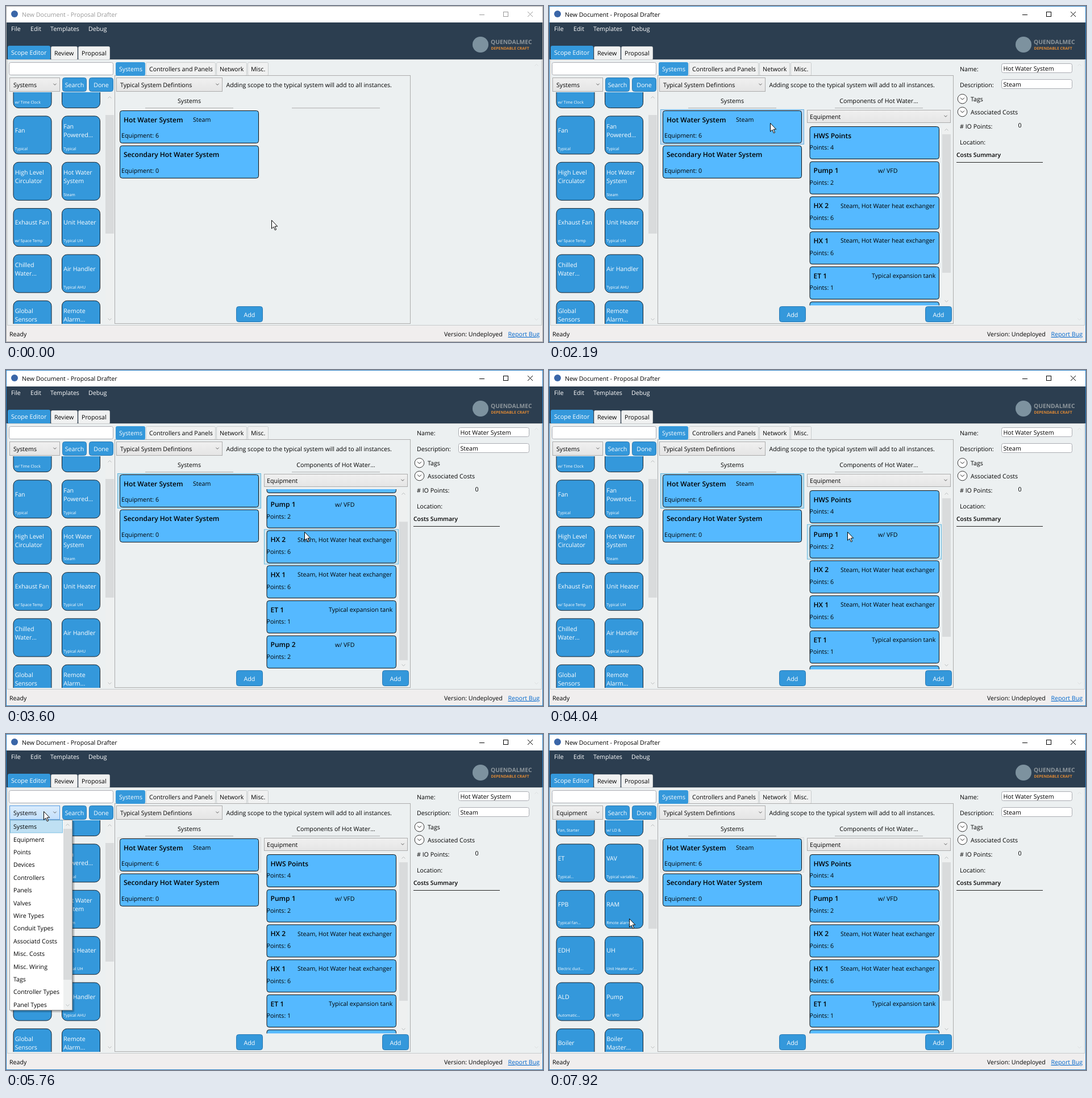
Write an HTML page that moves like this. It is 945x592 px and loops after 8 s.

```html
<!DOCTYPE html>
<html lang="en">
<head>
<meta charset="utf-8">
<title>Scope editor</title>
<style>
html, body { margin: 0; width: 100%; height: 100%; overflow: hidden; }
svg { display: block; width: 945px; height: 592px; }
text { font: 10.65px "Open Sans", "Noto Sans", sans-serif; text-rendering: geometricPrecision; white-space: pre; }
</style>
</head>
<body>
<svg id="stage" viewBox="0 0 945 592">
  <defs>
    <linearGradient id="gray" x2="0" y2="1"><stop stop-color="#f0f0f0"/><stop offset="1" stop-color="#e5e5e5"/></linearGradient>
    <linearGradient id="hot" x2="0" y2="1"><stop stop-color="#ecf4fc"/><stop offset="1" stop-color="#dcecfc"/></linearGradient>
    <linearGradient id="pressed" x2="0" y2="1"><stop stop-color="#daecfc"/><stop offset="1" stop-color="#c4e0fc"/></linearGradient>
    <clipPath id="tileClip"><rect x="3" y="152" width="172" height="408"/></clipPath>
    <clipPath id="partClip"><rect x="453" y="210" width="239" height="317.5"/></clipPath>
    <clipPath id="dropClip"><rect x="5" y="151" width="118" height="342"/></clipPath>
  </defs>
  <g id="scene"></g>
</svg>
<script>
const LOOP = 8000, BLUE = '#3498db', PAPER = '#ecf0f1', LINE = '#acacac', PITCH = 61.75;
const LISTS = {
  Systems: [';w/ Time Clock', ';', 'Fan;Typical', 'Fan|Powered...;Typical', 'High Level|Circulator;', 'Hot Water|System;Steam',
    'Exhaust Fan;w/ Space Temp', 'Unit Heater;Typical UH', 'Chilled|Water...;', 'Air Handler;Typical AHU',
    'Global|Sensors;', 'Remote|Alarm...;'],
  Equipment: [';Fan, Starter', ';w/ LD &amp; CP', 'ET;Typical...', 'VAV;Typical variable...', 'FPB;Typical fan...', 'RAM;Rmote alarm...',
    'EDH;Electric duct...', 'UH;Unit Heater w/...', 'ALD;Automatic...', 'Pump;w/ VFD', 'Boiler;', 'Boiler|Master...;']
};
const KINDS = ['Systems', 'Equipment', 'Points', 'Devices', 'Controllers', 'Panels', 'Valves', 'Wire Types', 'Conduit Types',
  'Associatd Costs', 'Misc. Costs', 'Misc. Wiring', 'Tags', 'Controller Types', 'Panel Types'];
const EXCHANGER = ['Steam, Hot Water heat exchanger', 513];
const PARTS = [['HWS Points', 4, '', 0], ['Pump 1', 2, 'w/ VFD', 579], ['HX 2', 6, ...EXCHANGER], ['HX 1', 6, ...EXCHANGER],
  ['ET 1', 1, 'Typical expansion tank', 568], ['Pump 2', 2, 'w/ VFD', 579]];

// Pointer moves: first step, last step, step count, bend, end.
const START = [467, 377];
const MOVES = [
  [120, 720, 10, [520, 300], [369, 210]],
  [2190, 2190, 1, [380, 208], [389, 206]],
  [2267, 2730, 7, [470, 218], [523, 281]],
  [3500, 3600, 2, [524, 283], [525, 285]],
  [4740, 5210, 7, [394, 211], [99, 156]],
  [5290, 5520, 4, [80, 142], [66, 136]],
  [6230, 6460, 4, [68, 160], [68, 188]],
  [6690, 6690, 1, [69, 189], [69, 189]],
  [7150, 7230, 2, [71, 189], [72, 189]],
  [7540, 7920, 6, [196, 250], [141, 325]]
];

function pointer(t) {
  let p = START;
  for (const [from, to, n, bend, end] of MOVES) {
    if (t < from) break;
    const step = (to - from) / (n - 1) || 1;
    const u = Math.min(n, Math.floor((t - from) / step + 1e-6) + 1) / n, v = 1 - u;
    p = p.map((a, i) => v * v * a + 2 * u * v * bend[i] + u * u * end[i]);
  }
  return p;
}

// The last value whose time has come.
const at = (t, ...steps) => steps.reduce((now, [time, value]) => t >= time ? value : now, 0);

const rect = (x, y, w, h, fill, stroke = 'none', r = 0, more = '') =>
  `<rect x="${x}" y="${y}" width="${w}" height="${h}" rx="${r}" fill="${fill}" stroke="${stroke}" ${more}/>`;
const text = (x, y, s, fill = '#000', style = '', anchor = 'start') =>
  `<text x="${x}" y="${y}" fill="${fill}" style="${style}" text-anchor="${anchor}">${s}</text>`;
const path = (d, stroke, more = '') => `<path d="${d}" fill="none" stroke="${stroke}" ${more}/>`;
const hline = (x1, x2, y, color) => path(`M${x1} ${y}H${x2}`, color);
const chevron = (x, y, dir = 1, color = '#606060', s = 2.6) =>
  path(`M${x - s} ${y - s / 2 * dir}l${s} ${s * dir}l${s} ${-s * dir}`, color);
const bold = size => `font-weight:600;font-size:${size}px`;

const combo = (x, y, w, h, label, fill = 'gray', border = LINE) =>
  rect(x + .5, y + .5, w - 1, h - 1, `url(#${fill})`, border) +
  text(x + (h > 24 ? 7 : 5), y + h / 2 + 4.3, label) + chevron(x + w - 9, y + h / 2 - .5);
const button = (x, y, w, h, label) =>
  rect(x + .5, y + .5, w - 1, h - 1, BLUE, '#2a7ab3', 4) + text(x + w / 2, y + h / 2 + 4.5, label, '#fff', '', 'middle');
const input = (x, y, w, h, label) => rect(x, y, w, h, '#fff', '#abadb3', 3) + text(x + 3, y + 12.5, label);
const tab = (x, y, w, h, label, on) =>
  rect(x + .5, y + .5, w - 1, h, on ? BLUE : '#f0f1f1', on ? BLUE : '#c9cccd', 2) + text(x + 6, y + 16, label, on ? '#fff' : '#000');
const scrollbar = (x, top, bottom, thumb, size, arrows = '#b9bcbd') =>
  rect(x, top, 15, bottom - top, '#eef0f0') + rect(x, thumb, 15, size, '#d9dbdc') +
  chevron(x + 7.5, top + 8, -1, arrows, 3) + chevron(x + 7.5, bottom - 8, 1, arrows, 3);
const mark = (x, y, w, fill, border) => rect(x + .5, y + .5, w - 1, 61, fill, border);

function card(x, y, w, title, note, noteX, count) {
  return rect(x + .5, y + .5, w - 1, 57, '#55b9ff', '#111', 4) + text(x + 7, y + 20.7, title, '#000', bold(12.05)) +
    text(noteX, y + 20, note) + text(w > 240 ? x + 3 : x, y + (w > 240 ? 48 : 41.3), count);
}

function tile(item, i) {
  const [name, note] = item.split(';'), lines = name.split('|');
  const x = i % 2 ? 98.5 : 13, y = 112.6 + 81.35 * Math.floor(i / 2);
  return rect(x, y, 67, 67, BLUE, '#16232e', 9) +
    lines.map((s, k) => text(x + 2.7, y + (lines[1] ? 21.7 + 15 * k : 28.7), s, '#fff')).join('') +
    text(x + 2.7, y + 59.6, note, '#fff', 'font-size:7px');
}

function frame(active) {
  const ink = active ? '#000' : '#999';
  return rect(0, 0, 945, 592, PAPER) + rect(0, 0, 945, 29, '#fff') + rect(0, 29, 945, 65, '#2c3e50') +
    '<circle cx="15" cy="14" r="6" fill="#3a66a8"/>' +
    text(28, 18.7, 'New Document - Proposal Drafter', ink) +
    hline(833, 842, 15.5, ink) + rect(875.5, 10.5, 8, 8, 'none', ink) + path('M918 10l9 9m0-9l-9 9', ink) +
    [['File', 9], ['Edit', 43], ['Templates', 78], ['Debug', 145]].map(([s, x]) => text(x, 44, s, '#fff')).join('') +
    '<circle cx="835" cy="68" r="14" fill="#7d929f"/>' +
    text(853, 67, 'QUENDALMEC', '#8d969c', 'font-weight:700;font-size:10.3px') +
    text(853.5, 77, 'DEPENDABLE CRAFT', '#e08a35', 'font-weight:700;font-size:6.8px') +
    tab(79, 71, 47, 23, 'Review') + tab(127, 71, 56, 23, 'Proposal') + tab(3, 70, 75, 24, 'Scope Editor', true) +
    rect(2.5, 94.5, 940, 468, PAPER, '#c8cbcc') +
    rect(0, 563, 945, 29, '#f0eeee') + text(6, 582, 'Ready') + text(771, 582, 'Version: Undeployed') +
    text(883.5, 582, 'Report Bug', '#0066cc', 'text-decoration:underline') +
    chevron(933.5, 104, -1, '#dcdfe0', 3) + chevron(933.5, 552, 1, '#dcdfe0', 3) +
    rect(.5, .5, 944, 591, 'none', active ? '#2a7fc4' : '#aaa');
}

function toolbox(t, x, y, open) {
  const kind = t < 7000 ? 'Systems' : 'Equipment';
  const over = x > 5 && x < 95 && y > 126 && y < 151;
  const overBar = x > 175 && x < 190 && y > 153;
  const look = !over ? ['gray', LINE] : open ? ['pressed', '#569de5'] : ['hot', '#7eb4ea'];
  return rect(5.5, 99.5, 183, 22, '#fff', '#abadb3', 3) +
    combo(6, 126, 89, 25, t < 6920 ? 'Systems' : 'Equipment', ...look) +
    button(99, 126, 43, 25, 'Search') + button(146, 126, 43, 25, 'Done') +
    `<g clip-path="url(#tileClip)">${LISTS[kind].map(tile).join('')}</g>` +
    scrollbar(175, 153, 560, ...(t < 7000 ? [192, 209] : [186, 157]), overBar ? '#606060' : undefined);
}

function systems(t, x, y) {
  const row = x > 196 && x < 449 ? Math.floor((y - 182) / PITCH) : -1;
  const selected = t >= 950, blurred = t >= 5675;
  let s = tab(246, 99, 123, 23, 'Controllers and Panels') + tab(370, 99, 54, 23, 'Network') + tab(425, 99, 37, 23, 'Misc.') +
    rect(191.5, 122.5, 520, 437, PAPER, LINE) + tab(193, 99, 52, 23, 'Systems', true) +
    combo(194, 126, 187, 25, 'Typical System Defintions') +
    text(387.5, 143, 'Adding scope to the typical system will add to all instances.') +
    text(322.5, 170.5, 'Systems', '#000', '', 'middle') + hline(245, 400, 179.8, LINE) + hline(503, 658, 179.8, LINE) +
    button(405, 529, 47, 28, 'Add');
  if (blurred) s += mark(196, 182, 253, '#dadada3d', '#dadada');
  else if (selected) s += mark(196, 182, 253, row === 0 ? '#0080ff2e' : '#26a0da3d', row === 0 ? '#66b0e0' : '#26a0daa8');
  if ((row === 0 && !selected) || row === 1) s += mark(196, 182 + PITCH * row, 253, '#26a0da1f', '#26a0daa8');
  return s + card(200, 184, 245, 'Hot Water System', 'Steam', 329, 'Equipment: 6') +
    card(200, 184 + PITCH, 245, 'Secondary Hot Water System', '', 0, 'Equipment: 0');
}

function parts(t, x, y) {
  const scroll = at(t, [3040, 45], [3190, 53], [3960, 8], [4040, 0]);
  const row = x > 454 && x < 691 && y > 210 && y < 528 ? Math.floor((y + scroll - 210) / PITCH) : -1;
  const top = i => 212 + PITCH * i - scroll;
  return text(580.5, 170.5, 'Components of Hot Water...', '#000', '', 'middle') +
    combo(454, 183, 253, 23, 'Equipment') + '<g clip-path="url(#partClip)">' +
    (row >= 0 ? mark(454, top(row) - 2, 237, '#26a0da1f', '#26a0daa8') : '') +
    PARTS.map(([name, n, note, noteX], i) => card(458.5, top(i), 228.5, name, note, noteX, 'Points: ' + n)).join('') + '</g>' +
    scrollbar(692, 210, 528, 226 + scroll * .78, 244) + button(662, 529, 47, 28, 'Add');
}

function details() {
  const expander = (y, label) =>
    `<circle cx="727.5" cy="${y}" r="8.3" fill="#fff" stroke="#333"/>` + chevron(727.5, y - .3, 1, '#222', 3.4) + text(742, y + 4.3, label);
  return text(723, 115, 'Name:') + input(796.5, 101.5, 124, 16, 'Hot Water System') +
    text(723, 143, 'Description:') + input(796.5, 129.5, 124, 16, 'Steam') +
    expander(163.7, 'Tags') + expander(186.5, 'Associated Costs') +
    text(723, 216, '# IO Points:') + text(825.5, 214.3, '0') + text(723, 244, 'Location:') +
    text(717, 265.5, 'Costs Summary', '#000', bold(10.4)) + hline(717, 869, 275.5, '#222');
}

function dropdown(t, y) {
  const shown = at(t, [5590, .4], [5675, .8], [5760, 1]);
  const row = Math.max(0, Math.floor((y - 151.5) / 22.4));
  return `<g clip-path="url(#dropClip)"><g transform="translate(0 ${(shown - 1) * 336})">` +
    [4, 3, 2, 1].map(d => rect(8, 153, 109 + d, 334 + d, '#00000016', 'none', d)).join('') +
    rect(6.5, 151.5, 110, 335, '#fff', '#999') +
    rect(7.5, 152 + 22.4 * row, 92, 22, '#bfe0f3', '#7fc0e4') +
    KINDS.map((s, i) => text(13, 167.2 + 22.4 * i, s)).join('') + scrollbar(101, 152, 486, 167, 266) + '</g></g>';
}

function draw(t) {
  const [x, y] = pointer(t), open = t >= 5590 && t < 6920;
  return frame(t >= 950) + toolbox(t, x, y, open) + systems(t, x, y) +
    (t >= 1120 ? parts(t, x, y) + details() : '') + (open ? dropdown(t, y) : '') +
    `<path d="M.5 .5v14.7l3.4-3.2 2.5 5.8 2.2-.9-2.5-5.7h4.6z" fill="#fff" stroke="#000" transform="translate(${x} ${y})"/>`;
}

const scene = document.getElementById('scene'), start = performance.now();
let last = '';
function tick() {
  const markup = draw((performance.now() - start) % LOOP);
  if (markup !== last) scene.innerHTML = last = markup;
  requestAnimationFrame(tick);
}
tick();
</script>
</body>
</html>
```
